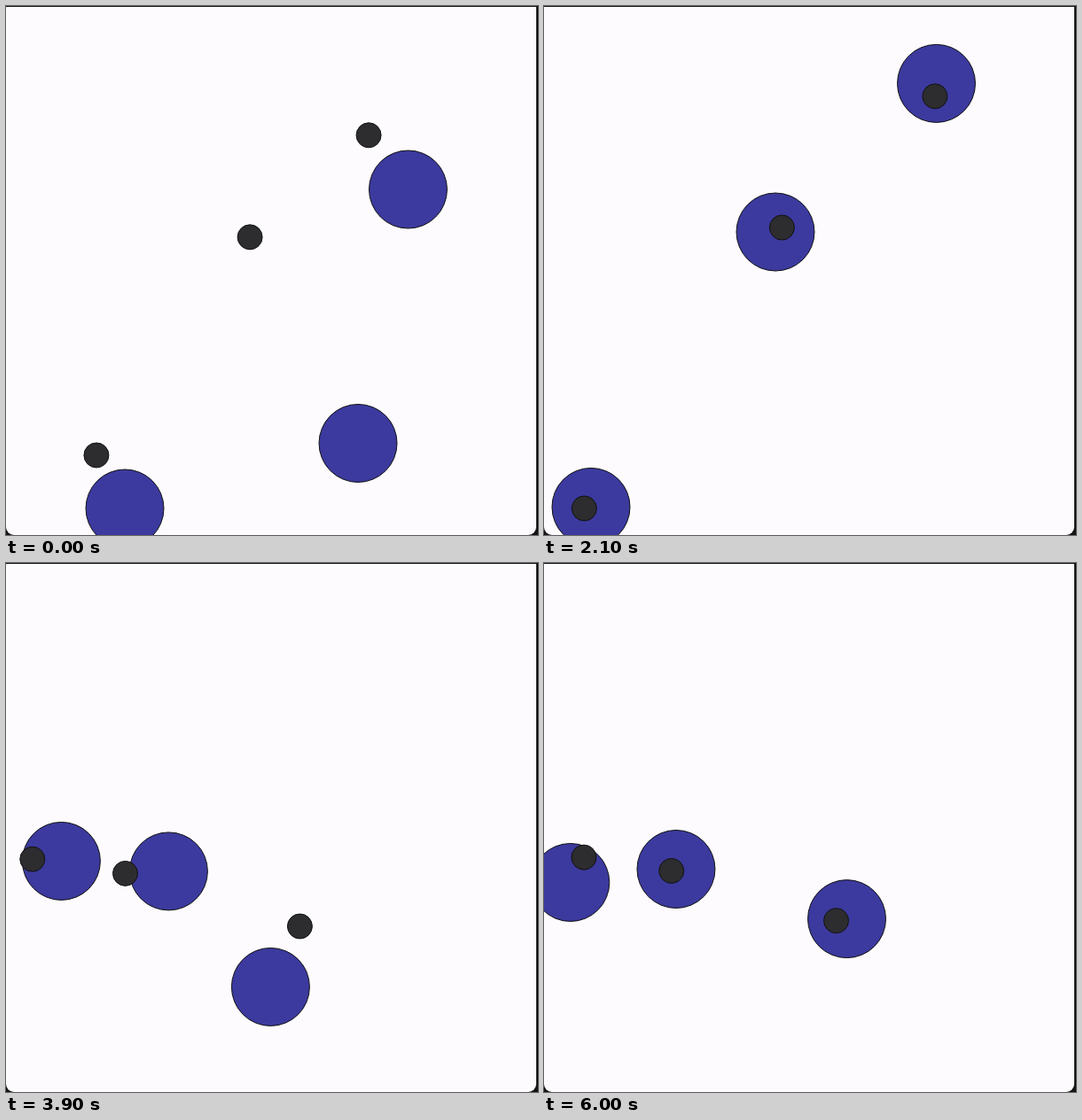
Write an HTML page with a canvas that moves like this. It is 600 px wide and 597 px high and loops after 6.2 s.

```html
<!DOCTYPE html>
<html lang="en">
<head>
<meta charset="utf-8">
<title>Agents and landmarks</title>
<style>
  html, body { margin: 0; width: 100%; height: 100%; overflow: hidden; background: #141315; }
  canvas { position: absolute; left: 0; top: 1px; border-radius: 0 0 9px 9px; background: #fdfbfe; }
</style>
</head>
<body>
<canvas id="view" width="598" height="596"></canvas>
<script>
const LOOP = 6200, STEP = 100, LAST = 60, RESET = 28;
const CENTER = 298.4, REACH = 268.6;

// Each agent follows a short route of [step, x, y] from rest to rest,
// then drifts between the end of the route and its sway point.
const episodes = [
  {
    swing: 7,
    landmarks: [[142.5, -196.5], [-30, -48.4], [-253, 268.6]],
    agents: [
      { route: [[0, 199.7, -117.7], [10, 144, -211], [14, 154.5, -200]], sway: [144.1, -211] },
      { route: [[0, 127, 251.2], [10, -34, -50], [14, -22.3, -54.5]], sway: [-37.4, -43.4] },
      { route: [[0, -211.7, 345.9], [10, -256, 268], [14, -246, 269.5]], sway: [-245.4, 267] }
    ]
  },
  {
    swing: 14,
    landmarks: [[-268.6, 35.8], [-163.9, 52], [33, 111.6]],
    agents: [
      { route: [[28, 14.5, -166.4], [39, -236, 38], [46, -270.2, 62]], sway: [-284.7, 65.8] },
      { route: [[28, 51, -91], [39, -115, 49.5], [46, -158, 46.4]], sway: [-158.4, 49.9] },
      { route: [[28, 131.2, 109.3], [35, 38, 225], [39, 0, 180], [46, 50.4, 115.5]], sway: [45.7, 109.4] }
    ]
  }
];

const ctx = document.getElementById("view").getContext("2d");
const mix = (a, b, k) => a + (b - a) * k;

// Hermite curve; the speed at an inner point comes from its neighbours.
function along(route, axis, step) {
  const speed = k => {
    const before = route[k - 1], after = route[k + 1];
    return before && after ? (after[axis] - before[axis]) / (after[0] - before[0]) : 0;
  };
  const i = route.findIndex(p => p[0] > step) - 1;
  const a = route[i], b = route[i + 1];
  const h = b[0] - a[0], u = (step - a[0]) / h, v = 1 - u;
  return mix(a[axis], b[axis], u * u * (3 - 2 * u)) + h * u * v * (v * speed(i) - u * speed(i + 1));
}

function locate({ route, sway }, swing, step) {
  const [settled, x, y] = route[route.length - 1];
  if (step < settled) return [along(route, 1, step), along(route, 2, step)];
  const k = (1 - Math.cos(Math.PI * (step - settled) / swing)) / 2;
  return [mix(x, sway[0], k), mix(y, sway[1], k)];
}

function disc([x, y], radius, color, zoom) {
  ctx.beginPath();
  ctx.arc(CENTER + x * zoom, CENTER - 1 + y * zoom, radius, 0, 2 * Math.PI);
  ctx.fillStyle = color;
  ctx.fill();
  ctx.stroke();
}

function draw(step) {
  const { swing, landmarks, agents } = episodes[step < RESET ? 0 : 1];
  const moved = agents.map(agent => locate(agent, swing, step));
  // The camera keeps the farthest body at a fixed distance from the centre.
  const zoom = REACH / Math.max(...[...moved, ...landmarks].flat().map(Math.abs));
  ctx.clearRect(0, 0, ctx.canvas.width, ctx.canvas.height);
  ctx.strokeStyle = "#111";
  moved.forEach(p => disc(p, 44, "#3c3a9e", zoom));
  landmarks.forEach(p => disc(p, 14, "#2d2c2f", zoom));
}

const start = performance.now();
function tick() {
  const time = (performance.now() - start) % LOOP;
  draw(Math.min(LAST, Math.floor(time / STEP)));
  requestAnimationFrame(tick);
}
tick();
</script>
</body>
</html>
```
